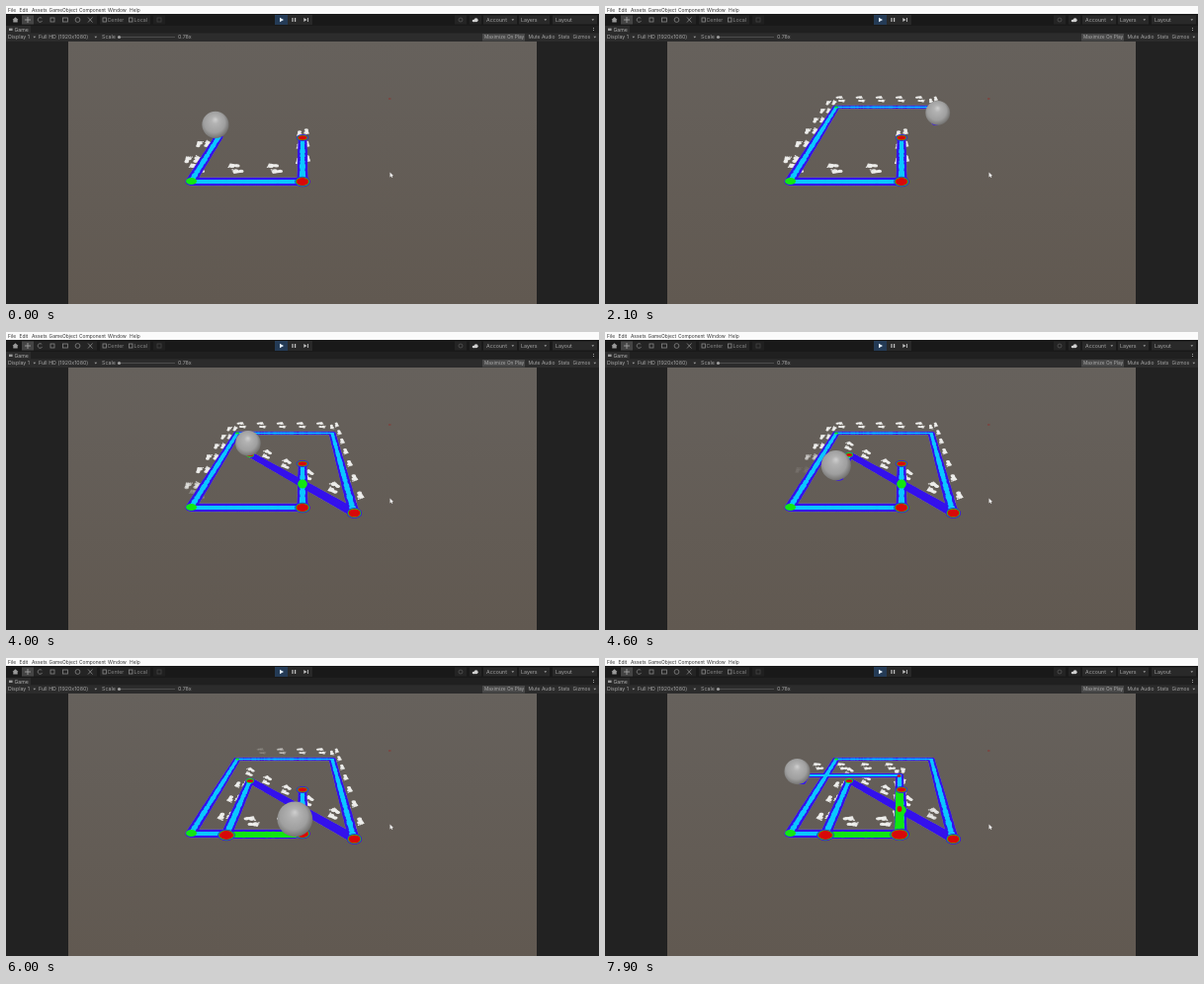
Recreate the animation shown at these times as an HTML page with a canvas. Size 600 px wide and 302 px high, loop 8 s.

```html
<!DOCTYPE html>
<html lang="en">
<head>
<meta charset="utf-8">
<title>Footprint heat trail</title>
<style>
html, body { margin: 0; width: 100%; height: 100%; overflow: hidden; background: #222; }
canvas { display: block; }
</style>
</head>
<body>
<canvas id="stage" width="600" height="302"></canvas>
<script>
const ctx = document.getElementById('stage').getContext('2d');
const LOOP = 8000, TICK = 100, FADE_FROM = 4450, FADE_TO = 5000;
const BLUE = '#3512ec', CYAN = '#0cc8ff', GREEN = '#12e612', RED = '#d80808', WHITE = '#efefed';
const clamp = v => Math.max(0, Math.min(1, v));
const noise = i => { const v = Math.sin(i * 12.9898) * 43758.5453; return v - Math.floor(v); };

// Size of the ball, in pixels, where it touches the ground at height y.
const scaleAt = y => 10.8 + (y - 102) * 0.092;
// Things above the ground lean away from the middle of the view.
const lift = (p, k) => ({ x: p.x + (p.x - 290) * 0.048, y: p.y - k * scaleAt(p.y) });

// x, y, arrive, depart, then footprints per leg and phase of the leg that ends here
const stops = [
  [300, 133, -2400, -2300],
  [300, 178, -1700, -1600, 3, 0.5],
  [187, 178, -800, -750, 3, 0.72],
  [234, 102.5, 800, 850, 6, 0.5],
  [330, 102.5, 1720, 1740, 5, 0.35],
  [352, 183, 2920, 3250, 6.2, 0.1],
  [247, 124, 3950, 4100, 4.9, 0.77],
  [223, 179, 5050, 5400, 3.4, 1.13],
  [298, 179, 6050, 6150, 2.35, 0.86],
  [298, 119, 6850, 6920, 4, 0.5],
  [203, 119, 7690, 7710, 4.1, 0.4],
  [190, 143, 8250, 8250, 2, 0.9]
];
const legs = stops.slice(1).map((b, i) => {
  const a = stops[i];
  return { ax: a[0], ay: a[1], bx: b[0], by: b[1], start: a[3], end: b[2], count: b[4], phase: b[5],
    weak: i === 5, again: i === 7 || i === 8, length: Math.hypot(b[0] - a[0], b[1] - a[1]) };
});

// Even steps on the ground, seen in perspective.
function along(leg, s) {
  const za = (1 - s) / scaleAt(leg.ay), zb = s / scaleAt(leg.by), z = za + zb;
  return { x: (leg.ax * za + leg.bx * zb) / z, y: (leg.ay * za + leg.by * zb) / z };
}
const progress = (leg, t) => clamp((t - leg.start) / (leg.end - leg.start));

const prints = [];
legs.forEach(leg => {
  for (let k = 0; (k + leg.phase) / leg.count < 1; k++) {
    const s = (k + leg.phase) / leg.count;
    prints.push({ ...lift(along(leg, s), 0.75), size: scaleAt(along(leg, s).y),
      born: leg.start + s * (leg.end - leg.start),
      angle: Math.atan2((leg.by - leg.ay) / 0.65, leg.bx - leg.ax) });
  }
});

// x, y, time, rx, ry, colour
const spots = [
  [300, 178, -1700, 6.2, 4, RED], [300, 133.5, -2400, 4.6, 2.2, RED],
  [187.5, 177.5, -800, 5.5, 3.6, GREEN], [234, 102.5, 800, 2, 1, GREEN],
  [352.5, 183.5, 2920, 6, 4.1, RED], [300, 154, 3600, 4.8, 4.6, GREEN],
  [247, 124.5, 3950, 4, 2.4, GREEN], [247, 124.5, 3950, 3.2, 1.5, RED],
  [223, 179.5, 5050, 7.2, 4.4, RED], [298, 179, 6050, 8.2, 4.8, RED],
  [298, 153, 6450, 2.4, 3, RED], [297.5, 119.5, 6900, 2, 1.2, RED]
];

function rect(x, y, w, h, color) {
  ctx.fillStyle = color;
  ctx.fillRect(x, y, w, h);
}
function oval(x, y, rx, ry, color) {
  ctx.fillStyle = color;
  ctx.beginPath();
  ctx.ellipse(x, y, rx, ry, 0, 0, 7);
  ctx.fill();
}
function poly(points, color) {
  ctx.fillStyle = color;
  ctx.beginPath();
  points.forEach(([x, y]) => ctx.lineTo(x, y));
  ctx.fill();
}
function line(points, color, width = 0.8) {
  ctx.strokeStyle = color;
  ctx.lineWidth = width;
  ctx.beginPath();
  points.forEach(([x, y]) => ctx.lineTo(x, y));
  ctx.stroke();
}
function label(text, x, y, color = '#a4a4a4', size = 5.3) {
  ctx.fillStyle = color;
  ctx.font = size + 'px Inter, Roboto, sans-serif';
  ctx.fillText(text, x, y);
}
const caret = (x, y) => poly([[x, y], [x + 2.6, y], [x + 1.3, y + 1.6]], '#a0a0a0');

function drawBars() {
  rect(0, 0, 600, 8, '#fbfbfb');
  [['File', 2], ['Edit', 13.5], ['Assets', 26], ['GameObject', 43.5], ['Component', 74],
   ['Window', 103], ['Help', 125]].forEach(([s, x]) => label(s, x, 5.7, '#333', 4.9));

  rect(0, 8, 600, 12, '#191919');
  poly([[6.5, 14], [9.5, 11.2], [12.5, 14], [11.7, 14], [11.7, 16.6], [7.3, 16.6], [7.3, 14]], '#999');
  rect(16, 9.5, 76, 9, '#242424');
  rect(16, 9.5, 12, 9, '#444');
  line([[19, 14], [25, 14]], '#aaa');
  line([[22, 11], [22, 17]], '#aaa');
  ctx.strokeStyle = '#858585';
  ctx.beginPath();
  ctx.arc(34.5, 14, 2.3, 0.4, 5.6);
  ctx.stroke();
  ctx.strokeRect(45, 12, 4, 4);
  ctx.strokeRect(57.5, 12, 5, 4);
  ctx.beginPath();
  ctx.arc(72.5, 14, 2.4, 0, 7);
  ctx.stroke();
  line([[83, 11.5], [87.5, 16.5]], '#8a8a8a');
  line([[87.5, 11.5], [83, 16.5]], '#8a8a8a');
  rect(95, 9.5, 51, 9, '#242424');
  ctx.strokeRect(98, 12, 3.5, 4);
  ctx.strokeRect(124.5, 12, 3.5, 4);
  label('Center', 102.5, 16, '#888');
  label('Local', 129.5, 16, '#888');
  rect(149, 9.5, 12, 9, '#202020');
  ctx.strokeStyle = '#444';
  ctx.strokeRect(153, 12, 4, 4);

  rect(272, 9, 38, 10, '#282828');
  rect(272, 9, 13, 10, '#243b56');
  poly([[277, 11.8], [281, 14], [277, 16.2]], '#e5f1ff');
  rect(289.4, 12, 1.2, 4, '#c0c0c0');
  rect(292, 12, 1.2, 4, '#c0c0c0');
  poly([[301.3, 12], [304.5, 14], [301.3, 16]], '#c0c0c0');
  rect(305, 12, 0.9, 4, '#c0c0c0');

  rect(454, 9.5, 12, 9, '#242424');
  ctx.strokeStyle = '#555';
  ctx.beginPath();
  ctx.arc(460, 14, 2, 0, 7);
  ctx.stroke();
  rect(469, 9.5, 12, 9, '#242424');
  oval(473.5, 15, 1.8, 1.3, '#d0d0d0');
  oval(475.6, 14.2, 2, 2, '#d0d0d0');
  [['Account', 483, 34, 486], ['Layers', 519, 31, 521], ['Layout', 553, 45, 556]]
    .forEach(([s, x, w, tx]) => {
      rect(x, 9.5, w, 9, '#292929');
      label(s, tx, 16);
      caret(x + w - 5.5, 13.3);
    });

  rect(0, 20, 600, 7.5, '#202020');
  rect(0, 20, 25, 7.5, '#2c2c2c');
  rect(3, 22.6, 3.6, 2.4, '#999');
  label('Game', 8.5, 25.8, '#b0b0b0', 5.2);
  rect(594, 22, 1, 1, '#999');
  rect(594, 24, 1, 1, '#999');

  rect(0, 27.5, 600, 8.5, '#2c2c2c');
  label('Display 1', 2, 33.3);
  caret(27.5, 30.8);
  label('Full HD (1920x1080)', 33, 33.3);
  caret(89.5, 30.8);
  label('Scale', 97, 33.3);
  line([[114, 31.5], [171, 31.5]], '#555');
  oval(114.5, 31.5, 1.6, 1.6, '#a0a0a0');
  label('0.78x', 174, 33.3);
  rect(482, 28, 43, 7.5, '#484848');
  label('Maximize On Play', 484, 33.3, '#aaa', 4.8);
  label('Mute Audio', 528.5, 33.3, '#a4a4a4', 5);
  label('Stats', 558.5, 33.3, '#a4a4a4', 5);
  label('Gizmos', 573.5, 33.3, '#a4a4a4', 5);
  caret(594.5, 30.8);
}

function drawView() {
  rect(0, 36, 600, 266, '#222');
  const sky = ctx.createLinearGradient(0, 36, 0, 302);
  sky.addColorStop(0, '#66615c');
  sky.addColorStop(1, '#615951');
  rect(63, 36, 474, 266, sky);
  rect(387, 93.5, 2.5, 1, '#8a3530');
}

// Lays dots along every leg walked so far; distance flattens them.
function stamp(t, color, rx, ry, grow, pick, rough = 0) {
  legs.filter(pick).forEach(leg => {
    if (t < leg.start) return;
    const end = progress(leg, t), step = 0.65 / leg.length;
    for (let s = 0, i = 0; s <= end; s += step, i++) {
      const p = along(leg, s), r = scaleAt(p.y), k = 1 - rough * noise(i);
      if (color === GREEN && p.y < 134) break;
      oval(p.x, p.y, rx * r * k + grow, ry * r * r * k + grow, color);
    }
  });
}

function drawTrail(t) {
  const all = () => true;
  stamp(t, 'rgba(126,104,190,.12)', 0.31, 0.0122, 0.8, all);
  stamp(t, BLUE, 0.31, 0.0122, 0, all, 0.08);
  stamp(t, CYAN, 0.19, 0.0066, 0, leg => !leg.weak, 0.4);
  stamp(t, GREEN, 0.28, 0.0098, 0, leg => leg.again, 0.1);
  spots.forEach(([x, y, time, rx, ry, color]) => {
    if (t < time) return;
    if (color === RED && rx > 4) {
      oval(x, y, rx + 1.6, ry + 1.3, BLUE);
      oval(x, y, rx + 0.8, ry + 0.6, GREEN);
    }
    oval(x, y, rx, ry, color);
  });
}

function drawPrint(p, t) {
  const age = t - p.born;
  if (age < 0 || age > FADE_TO) return;
  ctx.save();
  ctx.globalAlpha = 0.95 * clamp((FADE_TO - age) / (FADE_TO - FADE_FROM));
  ctx.translate(p.x, p.y);
  ctx.scale(p.size, p.size * 0.65);
  ctx.rotate(p.angle);
  [-1, 1].forEach(side => {
    const x = side * 0.11, y = side * 0.24;
    oval(x - 0.19, y, 0.15, 0.14, WHITE);
    oval(x - 0.04, y + side * 0.03, 0.18, 0.12, WHITE);
    oval(x + 0.11, y, 0.15, 0.19, WHITE);
    for (let i = 0; i < 4; i++)
      oval(x + 0.3 - i * 0.035, y + side * (i * 0.1 - 0.14), 0.06, 0.05, WHITE);
  });
  ctx.restore();
}

function drawBall(t) {
  const leg = legs.filter(l => t >= l.start).pop();
  const ground = along(leg, progress(leg, t)), r = scaleAt(ground.y), { x, y } = lift(ground, 0.88);
  const shade = ctx.createRadialGradient(x, y - r * 0.4, 0, x - r * 0.1, y - r * 0.1, r * 1.12);
  shade.addColorStop(0, '#cfcfcf');
  shade.addColorStop(0.25, '#b2b2b2');
  shade.addColorStop(0.7, '#9f9f9f');
  shade.addColorStop(1, '#737270');
  oval(x, y, r, r, shade);
}

function drawCursor() {
  poly([[388.5, 168.5], [388.5, 173.5], [389.7, 172.5], [390.6, 174], [391.3, 173.6],
    [390.5, 172.2], [392, 172]], '#eee');
}

function draw(t) {
  drawView();
  prints.forEach(p => drawPrint(p, t));
  drawTrail(t);
  drawBall(t);
  drawCursor();
  drawBars();
}

const begin = performance.now();
let shown = -1;
function frame() {
  const t = Math.floor(((performance.now() - begin) % LOOP) / TICK) * TICK;
  if (t !== shown) draw(shown = t);
  requestAnimationFrame(frame);
}
frame();
</script>
</body>
</html>
```
